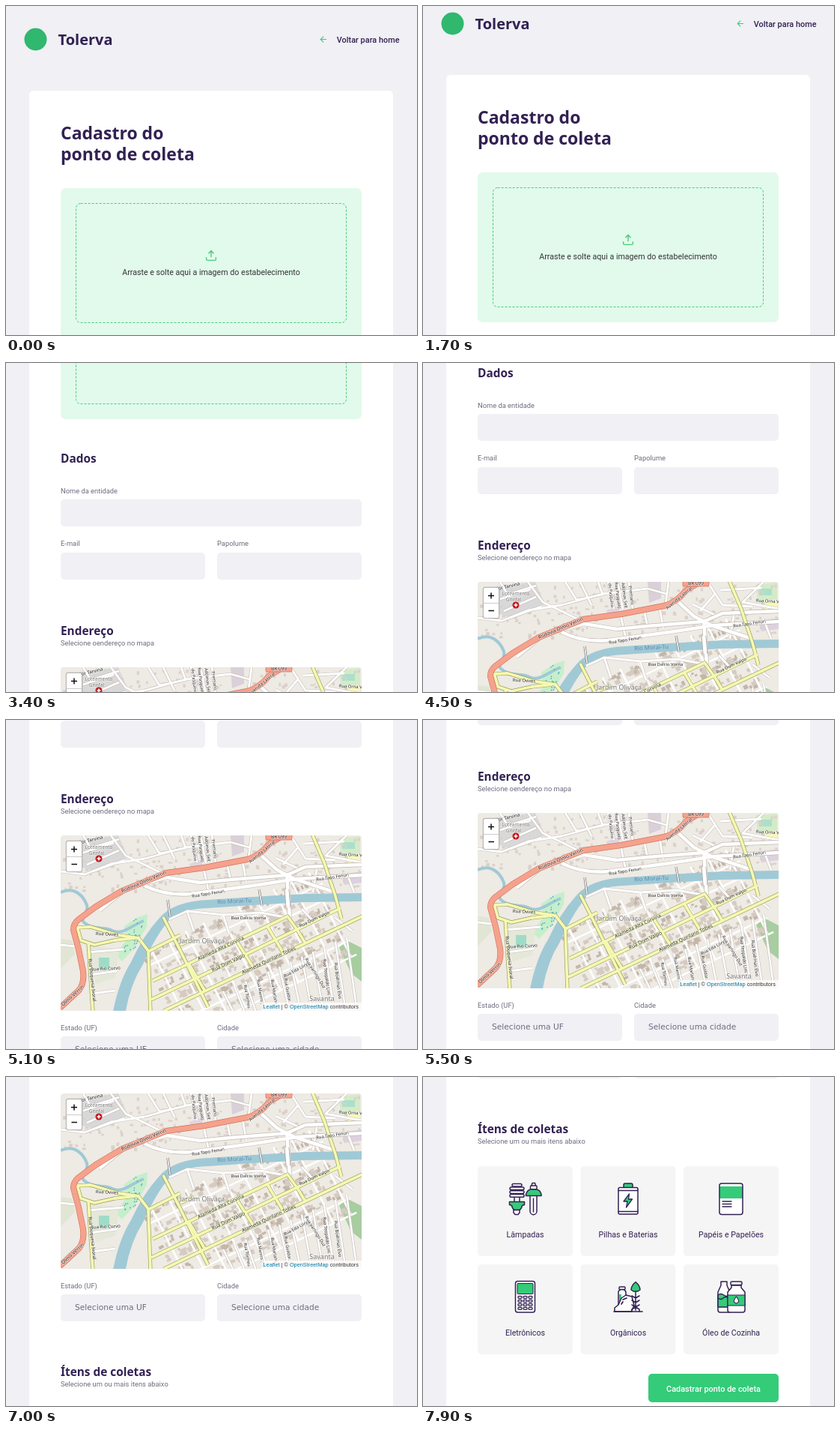
Write an HTML page with a canvas that moves like this. It is 549 px wide and 439 px high and loops after 8000 ms.

```html
<!DOCTYPE html>
<html lang="pt-BR">
<head>
<meta charset="utf-8">
<title>Cadastro do ponto de coleta</title>
<style>
html, body { margin: 0; width: 100%; height: 100%; overflow: hidden; background: #f0f0f5; }
canvas { display: block; }
</style>
</head>
<body>
<canvas id="stage" width="549" height="439"></canvas>
<script>
const W = 549, H = 439, LOOP = 8000;
const NAVY = '#322153', GREEN = '#34cb79', GRAY = '#6c6c80', FIELD = '#f0f0f5';
const HEADING = 'bold 15.4px "Noto Sans", sans-serif';
const BODY = '10.67px Roboto, sans-serif';
const MEDIUM = '500 10.9px Roboto, sans-serif';
const SMALL = '9.33px Roboto, sans-serif';
const SELECT = '10.67px "DejaVu Sans", sans-serif';

const page = document.createElement('canvas');
page.width = W;
page.height = 1530;
const c = page.getContext('2d');

function text(str, x, y, font, color, align = 'left') {
  c.font = font;
  c.fillStyle = color;
  c.textAlign = align;
  c.fillText(str, x, y);
}

function paint(path, fill, stroke, width) {
  if (fill) {
    c.fillStyle = fill;
    c.fill(path);
  }
  if (stroke) {
    c.strokeStyle = stroke;
    c.lineWidth = width;
    c.stroke(path);
  }
}

function box(x, y, w, h, r, fill, stroke, width = 1.5) {
  const path = new Path2D();
  path.roundRect(x, y, w, h, r);
  paint(path, fill, stroke, width);
}

function shape(d, fill, stroke = NAVY, width = 1.5) {
  paint(new Path2D(d), fill, stroke, width);
}

function icon(d, x, y, size, color) {
  c.save();
  c.translate(x, y);
  c.scale(size / 24, size / 24);
  shape(d, null, color, 2);
  c.restore();
}

function at(y, draw) {
  c.save();
  c.translate(0, y);
  draw();
  c.restore();
}

function random(seed) {
  return () => (seed = (seed * 16807) % 2147483647) / 2147483647;
}

function drawHeader() {
  box(24.5, 29.5, 30, 30, 15, '#2fb86e');
  text('Tolerva', 69.5, 52, 'bold 20px "Noto Sans", sans-serif', NAVY);
  icon('M19 12H5M12 19L5 12L12 5', 417.5, 37.8, 13.3, GREEN);
  text('Voltar para home', 525.5, 48.7, MEDIUM, NAVY, 'right');
}

function drawUpload() {
  const title = 'bold 23px "Noto Sans", sans-serif';
  text('Cadastro do', 73, 178, title, NAVY);
  text('ponto de coleta', 73, 206, title, NAVY);
  box(73, 243, 402, 200, 6.7, '#e1faec');
  c.setLineDash([3, 2]);
  box(93.5, 263.5, 361, 159, 6.2, null, '#4ecb79', 1);
  c.setLineDash([]);
  icon('M21 15v4a2 2 0 0 1-2 2H5a2 2 0 0 1-2-2v-4M17 8L12 3L7 8M12 3V15', 265.5, 324.5, 17, '#4ecb79');
  text('Arraste e solte aqui a imagem do estabelecimento', 274, 359, BODY, '#333', 'center');
}

function drawFields() {
  text('Dados', 73, 501, HEADING, NAVY);
  text('Nome da entidade', 73, 542, SMALL, GRAY);
  box(73, 550, 402, 36, 5, FIELD);
  text('E-mail', 73, 612, SMALL, GRAY);
  text('Papolume', 282, 612, SMALL, GRAY);
  text('Endereço', 73, 731, HEADING, NAVY);
  text('Selecione oendereço no mapa', 73, 745, SMALL, GRAY);
  text('Estado (UF)', 73, 1034, SMALL, GRAY);
  text('Cidade', 282, 1034, SMALL, GRAY);
  for (const x of [73, 282]) {
    box(x, 621, 193, 36, 5, FIELD);
    box(x, 1042, 193, 36, 5, FIELD);
  }
  text('Selecione uma UF', 92, 1063, SELECT, GRAY);
  text('Selecione uma cidade', 301, 1063, SELECT, GRAY);
}

function roads(list, width, fill, edge) {
  for (const d of list) shape(d, null, edge, width + 1.3);
  for (const d of list) shape(d, null, fill, width);
}

function label(str, x, y, deg = 0, size = 6.3, color = '#222', halo = 1.3) {
  c.save();
  c.translate(x, y);
  c.rotate(deg * Math.PI / 180);
  c.font = size + 'px "Noto Sans", sans-serif';
  c.textAlign = 'center';
  c.textBaseline = 'middle';
  if (halo) {
    c.strokeStyle = 'rgba(255,255,255,.6)';
    c.lineWidth = halo;
    c.strokeText(str, 0, 0);
  }
  c.fillStyle = color;
  c.fillText(str, 0, 0);
  c.restore();
}

function drawLand() {
  c.fillStyle = '#eeeae4';
  c.fillRect(73, 154, 402, 234);
  shape('M98 160L150 154L163 184L120 203L100 196Z', '#d9d8d8', null);
  shape('M300 154H318V176L302 182Z', '#d9d0d9', null);
  shape('M245 192L262 186V198L247 201Z', '#dfd4df', null);
  shape('M444 158L473 155V178L448 182Z', '#d5ebc8', null);
  shape('M449 163h17v9h-17z', '#aae0cb', null);
  shape('M456 181L473 179V189L458 191Z', '#f8f7b8', null);
  shape('M448 206L475 202V217L452 220Z', '#ddd1df', null);
  shape('M445 304L455 294L475 304V349L461 338Z', '#a7cda0', null);
  shape('M174 264L189 259L188 276L172 304L155 322L146 313L160 294L158 275Z', '#c5efcb', null);
  shape('M73 292L88 294L92 312L73 332Z', '#e1e6d4', null);
  shape('M106 301L151 305L146 344L120 352Z', '#e4e8d8', null);
  box(124, 317, 14, 16, 0, '#9fdcc8');
}

function drawBuildings() {
  const rnd = random(41);
  for (let i = 0; i < 170; i++) {
    c.fillStyle = '#dbd1c9';
    c.fillRect(76 + rnd() * 395, 156 + rnd() * 72, 2 + rnd() * 3, 2 + rnd() * 3);
  }
  // City blocks between parallel streets.
  const pitch = 21, first = 5;
  c.save();
  c.translate(290, 322);
  c.rotate(-0.442);
  for (let i = 0; i < 420; i++) {
    const street = first + pitch * (i % 6 - 3);
    c.fillStyle = i % 4 ? '#d6cbc1' : '#c3b6aa';
    c.fillRect(-95 + rnd() * 250, street + 3 + rnd() * 11, 2.5 + rnd() * 5, 2.5 + rnd() * 4);
  }
  for (let x = -80; x < 170; x += 26) shape(`M${x} -58L${x + 3} 68`, null, '#fff', 2.6);
  for (let k = -2; k < 4; k++) shape(`M-95 ${first + pitch * k}H165`, null, '#fff', 2.4);
  c.restore();
}

function drawWater() {
  const water = '#a0c9d6';
  shape('M73 230C92 221 104 236 108 247C111 260 98 262 104 270C116 281 132 275 142 281C157 287 164 276 184 268', null, water, 4);
  shape('M480 231L400 232L330 236L270 240Q224 242 205 264Q183 288 167 323Q150 350 142 394'
    + 'H159Q165 354 183 326Q200 288 217 268Q232 252 270 251L330 247L400 243L480 242Z', water, null);
  const rnd = random(9);
  for (let i = 0; i < 26; i++) {
    const y = 265 + rnd() * 47;
    box(178 - (y - 265) * .38 + (rnd() - .5) * 17, y, 1.8, 1.8, 1, '#5ca9c0');
  }
}

function drawRoads() {
  roads([
    'M73 202L105 206L140 192L185 185L240 170', 'M140 154L160 181L187 194L207 204',
    'M103 154L113 171L151 159', 'M108 193L151 174', 'M116 202L158 187', 'M103 177L144 164',
    'M190 154L205 178L240 171L234 154', 'M210 154L225 185', 'M247 154L255 190', 'M260 154L267 191',
    'M275 154L280 190', 'M240 170L300 163L325 170', 'M328 154L324 184', 'M455 154L427 181L475 190',
    'M380 154L400 185L440 187', 'M397 165L452 162', 'M360 184L392 199', 'M390 170L370 193',
    'M264 198L270 226', 'M295 191L300 214', 'M316 189L321 216', 'M416 193L410 230', 'M455 204L465 230',
    'M218 266L242 255L290 260L340 257L372 263', 'M242 255L251 282', 'M290 260L298 285', 'M395 252L410 268',
    'M440 264L463 282', 'M73 300L92 302', 'M108 310L157 306', 'M112 340L148 335', 'M115 365L146 361'
  ], 2.8, '#fff', '#c8c1bc');
  roads([
    'M125 254L162 224L215 210L259 217L300 213L375 207L400 196L475 193',
    'M185 221Q213 235 247 232L330 221L389 212L475 207',
    'M340 180L362 200L385 212L440 230', 'M375 204L379 264'
  ], 4.5, '#fff', '#c0b9b3');
  const south = [];
  for (let x = 290; x < 470; x += 15) south.push(`M${x} ${362 - (x - 290) * .44}L${x + 14} 390`);
  roads(south, 2.4, '#fff', '#c8c1bc');
  roads([
    'M408 150L425 190L440 235L448 265', 'M94 277L113 276L150 287L177 291L190 308L193 390',
    'M95 276L100 294L118 300L145 294L172 291', 'M110 296L116 390',
    'M190 309L233 287', 'M196 348L376 262L389 280', 'M194 373L297 324L412 268L447 251',
    'M211 388L351 321L478 261', 'M210 263L232 306L270 383', 'M233 300L250 292',
    'M244 325L266 362', 'M308 295L331 331', 'M349 275L371 312', 'M389 280L400 298'
  ], 3.8, '#f5f8b2', '#999d58');
  roads(['M380 148L352 165Q338 182 322 186L265 197L214 204L155 228L120 249L96 267Q90 272 90 280L97 306L103 335Q105 352 97 361L70 386'],
    6.8, '#f5a28d', '#d2735c');
  roads(['M216 240L219 262', 'M338 226L342 248'], 1.8, '#eee', '#777');
  roads(['M375 226L377 250'], 5, '#fff', '#999');
}

function drawLabels() {
  label('Rodovia Olmo Verrin', 184, 216, -23, 6.7);
  label('Olmo Verrin', 89, 368, -43, 6.7);
  label('or Tarvina', 115, 160, -14);
  label('Loteamento', 124, 170, 0, 6.5, '#777');
  label('Grinfal', 121, 178, 0, 6.5, '#777');
  label('Avenida Lateral', 342, 176, -40, 6);
  label('Rua Tapo Fenuri', 270, 232, -9, 5.8);
  label('Rua Tapo Fenuri', 436, 210, -8, 5.8);
  label('Rua Orna Vi', 461, 180, 3, 5.8);
  label('Rio Moraí-Tu', 305, 242, -3, 7.8, '#5b8bb5', 0);
  label('Rua Dalcio Vorna', 324, 264, 0, 5.8);
  label('Rua Ovirés', 135, 286, 3, 6);
  label('Rua Rio Curvo', 133, 332, -3, 6);
  label('Rua Duquesa Ivoral', 115, 347, 84, 6.3);
  label('Jardim Olivaça', 262, 295, 0, 9, '#777');
  label('Alameda Alta Corvina', 287, 305, -25, 6.7);
  label('Rua Dom Valpo', 297, 324, -25, 6.7);
  label('Rua Dom Valpo', 412, 266, -25, 6.1);
  label('Alameda Quirilano Tobes', 351, 321, -25, 6.7);
  label('Rua Eda Lory', 387, 334, -28, 5.8);
  label('Savanta', 422, 372, 0, 9, '#777');
  ['Rua Varlingo Duz', 'Rua Teopaldo Lim', 'Rua Bodrinas Elvo'].forEach((s, i) =>
    label(s, 413 + i * 15, 338 + i * 5, i ? 83 : 58, 5.8));
  ['Rua Tormeu', 'Rua Maniro Ino', 'Rua Marlano', 'Rua Guildor'].forEach((s, i) =>
    label(s, 322 + i * 18, 369 - i * 3, 80, 5.6));
  ['do Pasquino', 'Rua Pasquelo', 'Adolmas Selt', 'Premiano'].forEach((s, i) =>
    label(s, 251 + i * 9, 172, 83, 5.6));
  box(347, 151, 35, 9, 1, '#f5a28d', '#c96f5c', .7);
  label('BR 099', 364.5, 156, 0, 6.5);
}

function drawControls() {
  box(119.5, 180.5, 9, 9, 4.5, '#c4131c');
  shape('M124 182.5V187.5M121.5 185H126.5', null, '#fff', 1.6);
  box(80.4, 161.4, 21.2, 41.2, 2.5, '#fff', 'rgba(0,0,0,.25)', 1.2);
  shape('M81 182.5H101', null, '#ccc', 1);
  shape('M87 172.5H95M91 168.5V176.5M87.5 192.5H95', null, '#111', 1.5);

  c.fillStyle = 'rgba(255,255,255,.75)';
  c.fillRect(341, 377, 134, 11);
  let x = 343.5;
  const font = '7.33px "Liberation Sans", Arial, sans-serif';
  for (const [str, color] of [['Leaflet', '#0078a8'], [' | © ', '#333'], ['OpenStreetMap', '#0078a8'], [' contributors', '#333']]) {
    text(str, x, 385, font, color);
    x += c.measureText(str).width;
  }
}

function drawMap() {
  c.beginPath();
  c.roundRect(73, 154, 402, 234, 4);
  c.clip();
  c.lineJoin = 'round';
  drawLand();
  drawBuildings();
  drawWater();
  drawRoads();
  drawLabels();
  drawControls();
}

function drawLamps() {
  box(119, 142.5, 13, 3.5, 2, '#fff', NAVY);
  for (const y of [147, 151.8, 156.6]) box(116, y, 19, 3.6, 2, '#fff', NAVY);
  shape('M122 160.5V166M129 160.5V166');
  shape('M115.5 166.5h20v4l-3 1q-1 5-4 6h-6q-3-1-4-6l-3-1z', GREEN);
  shape('M121 177.5h8v3.5l-2 2.5h-4l-2-2.5z', '#fff');
  shape('M145 145l1-3.5h3.5l1 3.5', '#fff');
  box(143.5, 145, 8.5, 5, 1, '#fff', NAVY);
  shape('M143 158v21a4.5 4.7 0 0 0 9 0v-21', '#fff');
  shape('M147.5 162v18');
  shape('M137.5 158.5v-2q2-6 6-6.5h8q5 .5 6.5 6.5v2z', GREEN);
}

function drawBattery() {
  box(268, 142, 12, 6, 2, GREEN, NAVY);
  box(261, 147.5, 26, 35.5, 2, '#fff', NAVY);
  shape('M261 151.5h26M261 179.5h26');
  shape('M275.5 156l-7.5 10h5l-1.5 8 8-11h-5z', GREEN, NAVY, 1.3);
}

function drawPaper() {
  box(396, 142, 31, 41.5, 3, '#fff');
  box(396, 146, 31, 16, 0, GREEN);
  box(396, 142, 31, 41.5, 3, null, NAVY);
  shape('M400 166h12M400 169.5h12M400 173h12', null, NAVY, 1.3);
}

function drawPhone() {
  box(123.5, 272.5, 26, 41.5, 3, '#fff', NAVY);
  box(126, 275.5, 21, 14, 1, GREEN, NAVY, 1);
  for (let i = 0; i < 12; i++) {
    box(127 + i % 3 * 7, 292.5 + Math.floor(i / 3) * 5, 5, 2.8, 1, '#fff', NAVY, 1.3);
  }
}

function drawOrganics() {
  shape('M261 304V287q0-2 3-3.5h4q3 1.5 3 4v13', '#fff');
  box(262, 290, 3, 9, 0, GREEN);
  box(262, 280, 8, 3.5, 1, '#fff', NAVY);
  shape('M256 313v-5l5-4 4-9 6-4 8 2 3 12-4 8z', '#fff');
  shape('M255 313h38M267 297l5-2M265 303l2-3', null, NAVY, 1.7);
  shape('M284 286v25M279 292l5 3 5-3M279 298l5 3 5-3M279 304l5 3 5-3M279 313v-3l5-3 5 3v3');
  shape('M284 273.5q-6 5-6 10.5l3 2h6l3-2q0-5.5-6-10.5z', GREEN);
}

function drawOil() {
  shape('M398 273h8v5l3 7v29h-12q-3 0-3-3v-24l4-9z', '#fff');
  shape('M394 291q4-3 8 0t7 0v16h-15z', GREEN);
  shape('M394 295q4 3 7 0t8 0');
  shape('M412 278v3l-5 6v24q0 3 3 3h17q3 0 3-3v-24l-5-6v-3z', '#fff');
  shape('M407 291h23v14h-23z', GREEN, NAVY, 1.2);
  box(411, 273, 15, 4.5, 1.5, '#fff', NAVY);
  shape('M418.5 293q-4 5-3 7 3 4 6 0 1-2-3-7z', '#fff', NAVY, 1.2);
}

function drawItems() {
  text('Ítens de coletas', 73, 75, HEADING, NAVY);
  text('Selecione um ou mais itens abaixo', 73, 89, SMALL, GRAY);
  const names = ['Lâmpadas', 'Pilhas e Baterias', 'Papéis e Papelões', 'Eletrônicos', 'Orgânicos', 'Óleo de Cozinha'];
  names.forEach((name, i) => {
    const x = 73 + i % 3 * 137.55, y = i < 3 ? 119 : 250;
    box(x, y, 126.9, 120, 5, '#f5f5f5');
    text(name, x + 63.5, y + 95, BODY, NAVY, 'center');
  });
  c.lineJoin = c.lineCap = 'round';
  [drawLamps, drawBattery, drawPaper, drawPhone, drawOrganics, drawOil].forEach(draw => draw());
  box(301, 396, 174, 38, 5, GREEN);
  text('Cadastrar ponto de coleta', 388, 420, MEDIUM, '#fff', 'center');
}

function drawPage() {
  c.fillStyle = FIELD;
  c.fillRect(0, 0, W, page.height);
  drawHeader();
  box(31, 113, 486, 1500, 5.3, '#fff');
  drawUpload();
  drawFields();
  at(620, drawMap);
  at(1076, drawItems);
}

// Positions held between runs: [time, scroll position].
const holds = [[0, 0], [500, 5], [600, 8], [800, 11], [1000, 13], [1300, 16], [1500, 19], [1700, 21],
  [3400, 368], [3900, 378], [5500, 650], [5700, 653], [5900, 655], [7900, 1076]];

// Eased runs; warp skews the smoothstep towards its start or end.
const glides = [
  { start: 1900, end: 3400, from: 21, to: 368, warp: 1 },
  { start: 3500, end: 3900, from: 368, to: 378, warp: 1 },
  { start: 4100, end: 5500, from: 378, to: 650, warp: 0.69 },
  { start: 6500, end: 7900, from: 658, to: 1076, warp: 1.147 }
];

function scrollAt(time) {
  const t = Math.floor(time / 100) * 100;
  const run = glides.find(g => t >= g.start && t <= g.end);
  if (!run) return holds.findLast(([start]) => start <= t)[1];
  const p = ((t - run.start) / (run.end - run.start)) ** run.warp;
  return Math.round(run.from + (run.to - run.from) * p * p * (3 - 2 * p));
}

const stage = document.getElementById('stage').getContext('2d');
const began = performance.now();

function frame() {
  const time = (performance.now() - began) % LOOP;
  stage.drawImage(page, 0, -scrollAt(time));
  requestAnimationFrame(frame);
}

drawPage();
frame();
</script>
</body>
</html>
```
